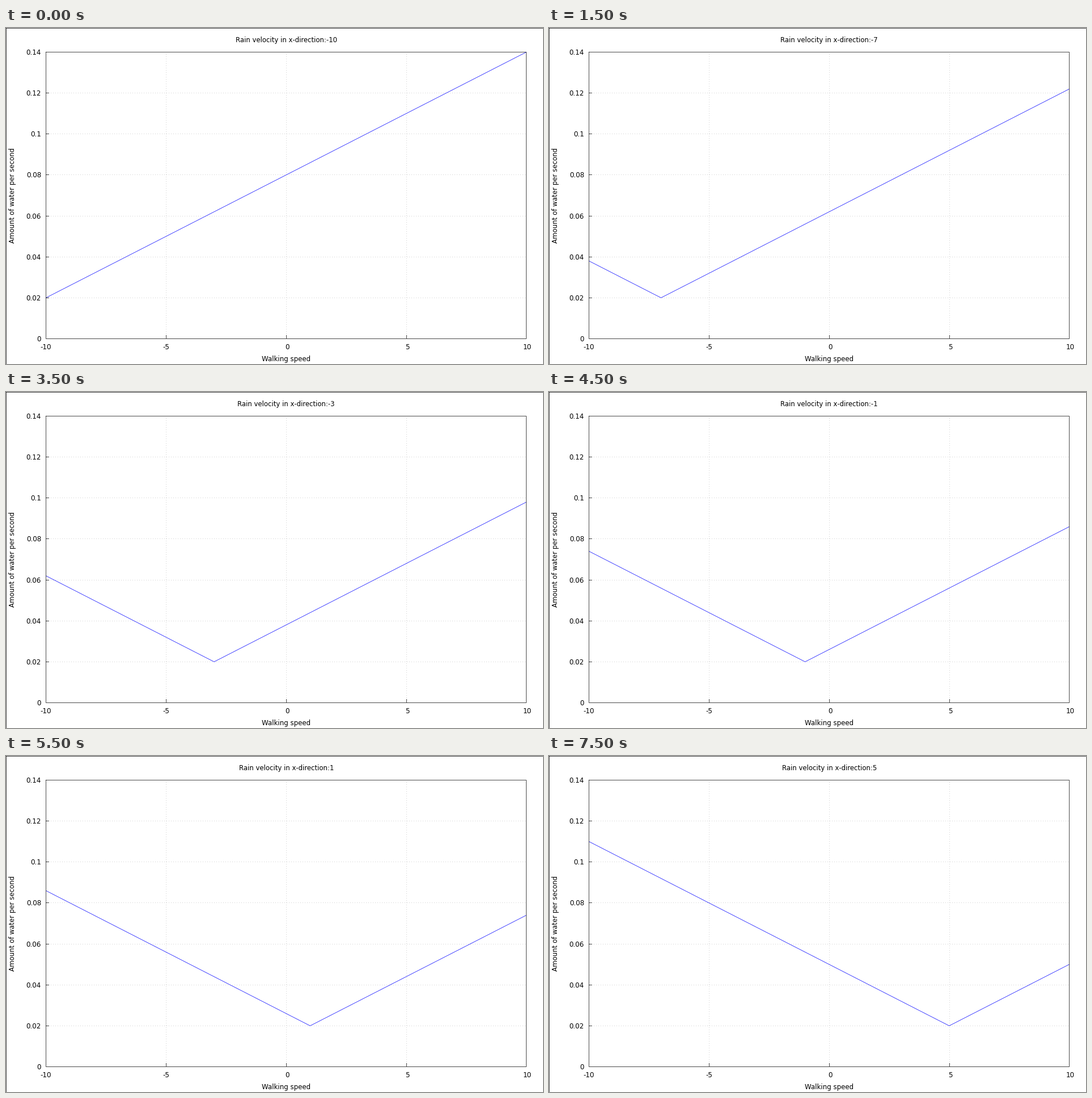
A matplotlib script that plays this animation: 947 px wide and 592 px high, repeating every 8000 ms.

```python
import math

import matplotlib.pyplot as plt
from matplotlib.animation import FuncAnimation

W, H, DPI = 947, 592, 64
PT = 72 / DPI  # points per pixel
LEFT, RIGHT, TOP, BOTTOM = 70, 917, 42, 547
STROKE = 0.7
SPEEDS = range(-10, 6)

plt.rcParams["font.family"] = "DejaVu Sans"

fig = plt.figure(figsize=(W / DPI, H / DPI), dpi=DPI, facecolor="white")
ax = fig.add_axes([0, 0, 1, 1])
ax.set_xlim(0, W)
ax.set_ylim(H, 0)
ax.axis("off")


def px(speed):
    return LEFT + 0.5 + (speed + 10) / 20 * (RIGHT - LEFT)


def py(water):
    return BOTTOM + 0.5 - water / 0.14 * (BOTTOM - TOP)


def line(xs, ys, color="black", z=3, width=STROKE, **kw):
    return ax.plot(xs, ys, color=color, lw=width * PT, snap=False,
                   zorder=z, **kw)[0]


def grid(xs, ys):
    line(xs, ys, "#cfcfcf", 1, 1, linestyle=(0, (1, 3)),
         dash_capstyle="butt")


def label(x, y, s, size=11.8, ha="center", **kw):
    return ax.text(x, y, s, fontsize=size * PT, ha=ha, va="baseline", **kw)


# Stage edge and plot frame
line([0, W], [0.5, 0.5])
line([0.5, 0.5], [0, H])
x0, x1, y0, y1 = LEFT + 0.5, RIGHT + 0.5, TOP + 0.5, BOTTOM + 0.5
line([x0, x1, x1, x0, x0], [y0, y0, y1, y1, y0], solid_joinstyle="miter",
     solid_capstyle="projecting")

for i in range(8):
    value = i * 0.02
    y = int(py(value)) + 0.5
    label(61.9, y + 4.4, f"{value:g}", 11.9, "right")
    if 0 < i < 7:
        grid([LEFT + 1, RIGHT], [y, y])
        line([LEFT, LEFT + 6], [y, y], solid_capstyle="butt")

for speed in range(-10, 11, 5):
    x = math.ceil(px(speed) - 0.5) + 0.5
    label(x + (1.8 if speed >= 0 else -0.4), 566, f"{speed}", 11.9)
    if abs(speed) < 10:
        grid([x, x], [BOTTOM, TOP + 1])
        line([x, x], [BOTTOM, BOTTOM - 6], solid_capstyle="butt")

label(494.2, 587, "Walking speed")
label(15, 294.5, "Amount of water per second", rotation=90,
      rotation_mode="anchor")
title = label(494.2, 25, "", 11.58)
curve = line([], [], "blue", 2, solid_capstyle="butt",
             solid_joinstyle="miter")


def update(i):
    rain = SPEEDS[i]
    walk = sorted({-10, rain, 10})
    curve.set_data([px(w) for w in walk],
                   [py(0.02 + 0.006 * abs(w - rain)) for w in walk])
    title.set_text(f"Rain velocity in x-direction:{rain}")
    return curve, title


anim = FuncAnimation(fig, update, frames=len(SPEEDS), interval=500,
                     repeat=True, repeat_delay=0, blit=False)
plt.show()
```
